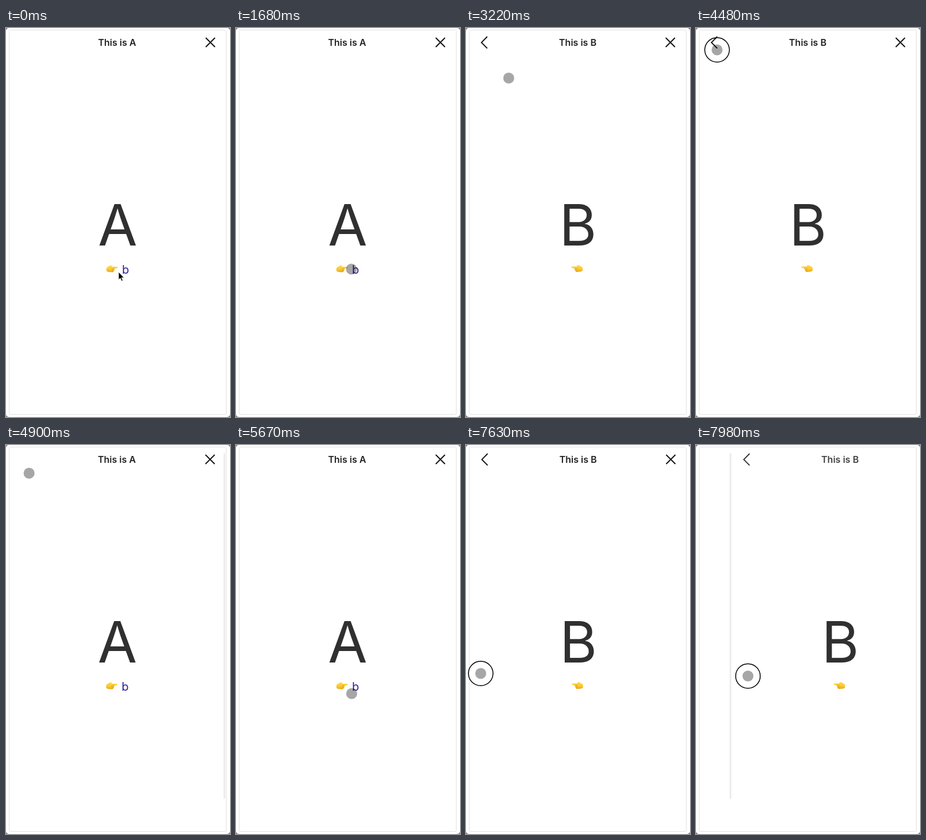
These frames come from a looping animation (388 by 676 pixels, 8 s). An HTML page:

```html
<!DOCTYPE html>
<html lang="en">
<head>
<meta charset="utf-8">
<title>Page stack</title>
<style>
  html, body { margin: 0; width: 100%; height: 100%; overflow: hidden; background: #fff; }
  svg { display: block; width: 388px; height: 676px; font-family: Inter, "Open Sans", sans-serif; }
  text { text-anchor: middle; fill: #2b2b2b; }
  .title { font-size: 16px; font-weight: 600; fill: #222; }
  .letter { font-size: 99px; fill: #303030; }
  .link { font-size: 20px; fill: #2e1f9e; }
  .icon { fill: none; stroke: #111; stroke-width: 1.9; }
</style>
</head>
<body>
<svg viewBox="0 0 388 676">
  <defs>
    <clipPath id="screen"><rect x="5" y="3" width="377" height="669" rx="2"/></clipPath>
    <linearGradient id="skin" x2="0" y2="1">
      <stop stop-color="#ffdc4a"/><stop offset=".6" stop-color="#fbc62f"/><stop offset="1" stop-color="#e9a81c"/>
    </linearGradient>
    <linearGradient id="shade"><stop stop-opacity="0"/><stop offset="1" stop-opacity=".13"/></linearGradient>
    <g id="hand">
      <path fill="url(#skin)" d="M0 5C3 2.5 6 .5 8.5 .5Q10.5 .9 9.5 2.8L18.5 3Q20.4 4.2 18.5 5.6L13.5 6Q14.8 7 13.6 8.2Q14 9.5 12.6 10.2Q12.5 12 10.5 12.4L4 12Q1 11.5 0 10Z"/>
      <path fill="none" stroke="#d89a14" stroke-width=".7" d="M9 6H15M9.5 8.2H13.4M9 10.3H12.5"/>
    </g>
    <path id="close" class="icon" d="M346 17L362 33M362 17L346 33"/>
  </defs>

  <path fill="#777" d="M0 0H388V676H0Z"/>
  <rect width="388" height="676" rx="5" fill="#fff"/>

  <g clip-path="url(#screen)">
    <g id="pageA">
      <text class="title" x="192.5" y="31">This is A</text>
      <use href="#close"/>
      <text class="letter" x="193.5" y="377.5">A</text>
      <use href="#hand" x="174" y="412"/>
      <text class="link" x="207" y="426.5">b</text>
    </g>
    <g id="pageB">
      <rect id="edge" x="1" y="14" width="4.5" height="601" rx="2" fill="url(#shade)"/>
      <rect x="5" y="3" width="377" height="669" fill="#fff"/>
      <g id="headB">
        <path class="icon" d="M36.8 15L26.8 25.2L36.8 35.4"/>
        <text class="title" x="193.5" y="31">This is B</text>
        <use href="#close"/>
      </g>
      <text class="letter" x="194" y="377.5">B</text>
      <use href="#hand" transform="translate(202 411.5) scale(-1 1)"/>
    </g>
  </g>
  <rect x="5.5" y="3.5" width="376" height="668" rx="2" fill="none" stroke="#e2e2e2"/>

  <path id="arrow" transform="translate(195 424)" stroke="#fff" stroke-width=".8" d="M0 0V13.5L3 10.7L5.2 15.8L7.4 14.8L5.2 10H9.5Z"/>
  <g id="touch">
    <circle r="9.5" fill-opacity=".35"/>
    <circle id="ring" r="21.3" fill="none" stroke="#000" stroke-width="1.5"/>
  </g>
</svg>
<script>
const $ = id => document.getElementById(id);
const LOOP = 8000, STEP = 70, WIDTH = 377, SLIDE = 490;
const easeIn = p => p * p, easeOut = p => 1 - (1 - p) ** 3;
const smooth = p => p * p * (3 - 2 * p), hold = p => p < 1 ? 0 : 1;

// time, x, y and the easing that leads to this point
const path = [
  [70, 193, 420], [140, 202, 418.5], [490, 201, 418.5, hold], [560, 201, 418.5],
  [700, 199.5, 418.5], [840, 202, 418.5], [1050, 201.5, 418.5, hold],
  [1470, 201.5, 418.5], [1680, 200, 419], [2940, 200, 419],
  [3220, 74, 87, smooth], [3780, 36.5, 38, easeOut], [4620, 36.5, 38],
  [4900, 40, 49, easeIn], [5390, 201.5, 457.5, smooth], [5460, 201.5, 463.5],
  [5530, 201.5, 463.5], [5740, 200, 421, smooth], [6230, 200, 422],
  [6370, 193.5, 436], [7210, 10.5, 397, smooth], [7560, 10.5, 397],
  [7630, 25.5, 397], [7980, 90, 401.5]
];
const presses = [[2240, 2380], [4480, 4620], [5740, 5880], [7280, LOOP]];

function touchAt(t) {
  const i = path.findIndex(k => k[0] >= t);
  if (i < 1) return path[0].slice(1, 3);
  const [t0, x0, y0] = path[i - 1], [t1, x1, y1, ease = p => p] = path[i];
  const p = ease((t - t0) / (t1 - t0));
  return [x0 + (x1 - x0) * p, y0 + (y1 - y0) * p];
}

const slide = (t, start) => 1 - (1 - Math.min(1, Math.max(0, (t - start) / SLIDE))) ** 4;

// how far page B stands to the right of its resting place
function offsetB(t) {
  if (t < 4550) return WIDTH * (1 - slide(t, 2310));
  if (t < 5810) return WIDTH * slide(t, 4550);
  if (t < 7630) return WIDTH * (1 - slide(t, 5810));
  return 0.7 + 55.3 * (t - 7630) / 350;
}

function draw(now) {
  const t = Math.floor(now % LOOP / STEP) * STEP;
  const dx = offsetB(t), [x, y] = touchAt(t);
  $('pageA').setAttribute('transform', `translate(${-80 * (1 - dx / WIDTH)})`);
  $('pageB').setAttribute('transform', `translate(${dx})`);
  $('headB').setAttribute('opacity', 1 - dx / WIDTH);
  $('edge').setAttribute('opacity', dx > 0 && dx < WIDTH ? 1 : 0);
  $('touch').setAttribute('transform', `translate(${x} ${y})`);
  $('touch').style.display = t < 70 ? 'none' : '';
  $('arrow').style.display = t < 70 ? '' : 'none';
  $('ring').style.display = presses.some(([a, b]) => t >= a && t < b) ? '' : 'none';
}

const start = performance.now();
function tick() {
  draw(performance.now() - start);
  requestAnimationFrame(tick);
}
tick();
</script>
</body>
</html>
```
